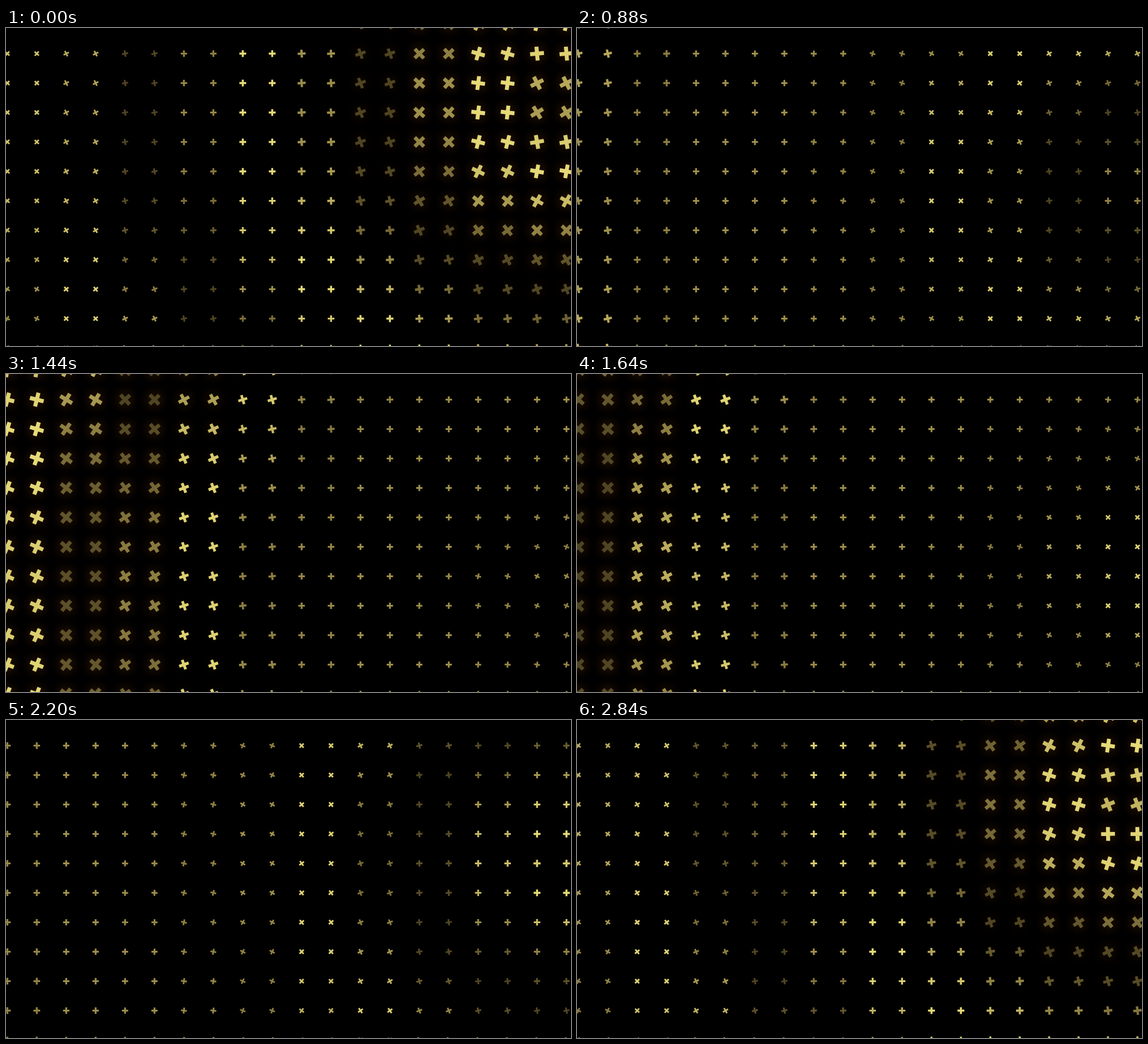
These frames come from a looping animation (960 px wide and 540 px high, 2.88 s). An HTML page with a canvas:

```html
<!DOCTYPE html>
<html lang="en">
<head>
<meta charset="utf-8">
<title>Plus field</title>
<style>
  html, body { margin: 0; width: 100%; height: 100%; overflow: hidden; background: #000; }
  canvas { display: block; width: 960px; height: 540px; }
</style>
</head>
<body>
<canvas id="stage" width="960" height="540"></canvas>
<script>
const ctx = document.getElementById('stage').getContext('2d');
const LOOP = 2880, STEP = 40, GRID = 50;

const clamp01 = v => Math.max(0, Math.min(1, v));
const smooth = u => u * u * (3 - 2 * u);

// "wave" is the signed distance, in px, from the moving ring.
function armLength(wave) {
  const a = Math.abs(wave);
  return 9.6 + 0.0035 * a + 11 / (1 + Math.exp((628 - a) / 55));
}

// A quarter turn across the ring, then a spin that speeds up away from it.
function turn(wave) {
  const quarter = 90 * (1 - smooth(clamp01((wave + 380) / 640)));
  const spin = wave > 0
    ? 17 * Math.pow(Math.max(0, wave - 420) / 180, 1.36)
    : 48 * Math.pow(Math.max(0, -wave - 480) / 270, 1.75);
  return (quarter - spin) * Math.PI / 180;
}

// Ripples of light, calm just outside the ring.
function brightness(wave) {
  const s = (wave - 45) / 895;
  const cycles = 2.5 * s - 0.16 * (1 - s * s);
  const calm = Math.exp(-Math.pow((wave - 270) / 280, 4));
  return 0.66 - 0.32 * (1 - 0.95 * calm) * Math.cos(2 * Math.PI * cycles);
}

function colour(light) {
  const r = 235 * light;
  const g = r * (0.82 + 0.13 * light);
  const b = r * (0.38 + 0.14 * light);
  return `rgb(${Math.round(r)},${Math.round(g)},${Math.round(b)})`;
}

function plus(x, y, wave) {
  const size = armLength(wave), thick = size * 0.285;
  ctx.save();
  ctx.translate(x, y);
  ctx.rotate(turn(wave));
  ctx.fillStyle = colour(brightness(wave));
  const glow = clamp01((size - 14) / 8);
  if (glow > 0) {
    ctx.shadowColor = `rgba(130,65,15,${0.65 * glow})`;
    ctx.shadowBlur = 20;
  }
  ctx.beginPath();
  ctx.rect(-size / 2, -thick / 2, size, thick);
  ctx.rect(-thick / 2, -size / 2, thick, size);
  ctx.fill();
  ctx.restore();
}

function draw(time) {
  const t = Math.floor((time % LOOP) / STEP) * STEP;
  // Ping-pong from 0 to 1 and back.
  const swing = 1 - Math.abs(1 - t / (LOOP / 2));
  const radius = 960 * (1 - swing);
  const centreY = 124 + 236 * swing;

  ctx.fillStyle = '#000';
  ctx.fillRect(0, 0, 960, 540);
  for (let col = 0; col < 20; col++) {
    // Neighbouring columns share one wave position.
    const dx = 960 - (52 + Math.floor(col / 2) * 2 * GRID);
    for (let row = 0; row < 12; row++) {
      const y = -6.5 + row * GRID;
      plus(2.3 + col * GRID, y, Math.hypot(dx, y - centreY) - radius);
    }
  }
}

const start = performance.now();
function tick() {
  draw(performance.now() - start);
  requestAnimationFrame(tick);
}
tick();
</script>
</body>
</html>
```
